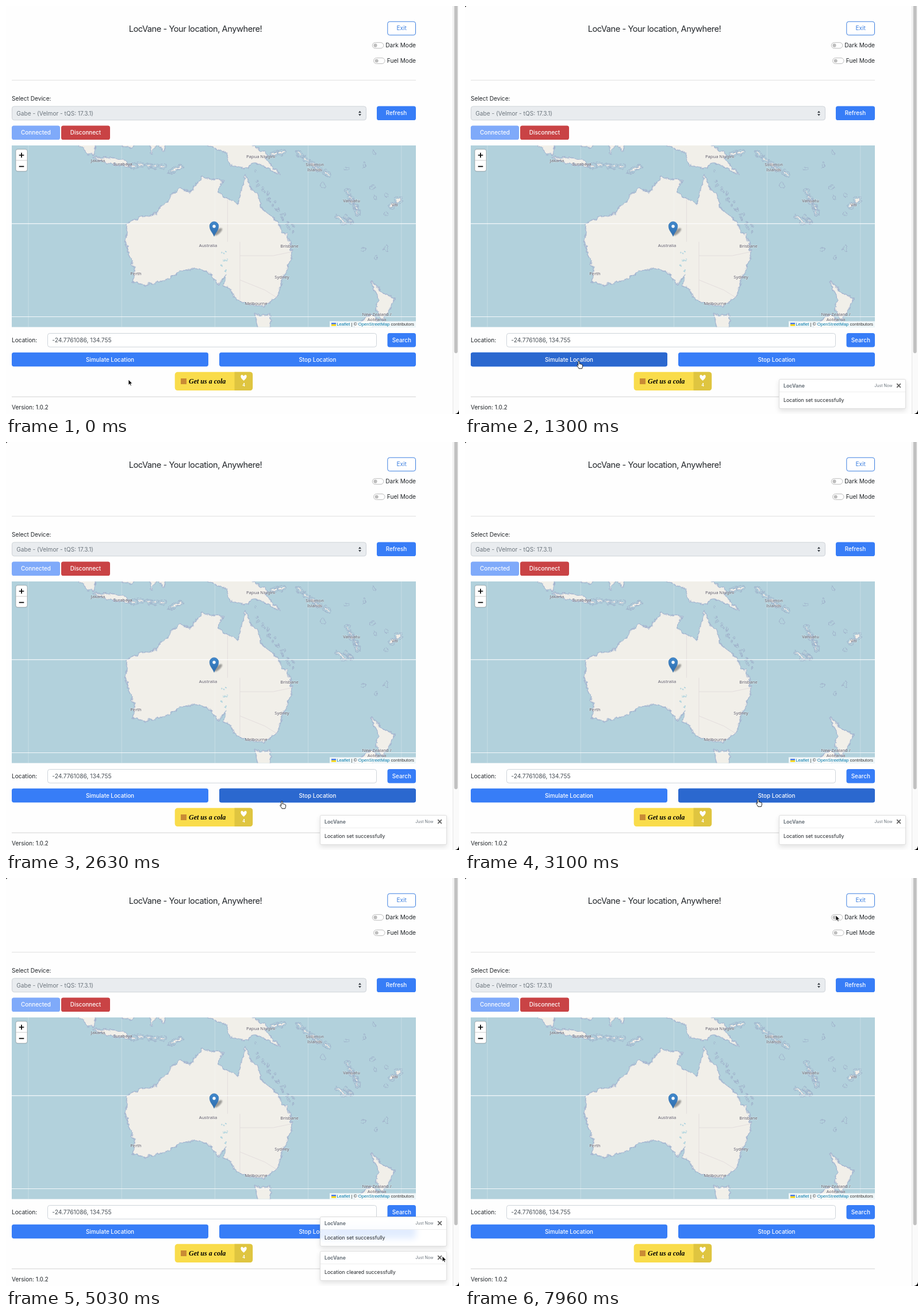
An HTML page that plays this animation: 788 by 711 pixels, repeating every 8000 ms.

```html
<!DOCTYPE html>
<html lang="en">
<head>
<meta charset="utf-8">
<title>Location simulator</title>
<style>
  html, body { margin: 0; width: 100%; height: 100%; overflow: hidden; background: #fefefe; }
  body { position: relative; font-family: Inter, sans-serif; }
  svg { position: absolute; left: 0; top: 0; }
  .label { font: 7.6px "Noto Sans", sans-serif; fill: #5c5864; text-anchor: middle;
    stroke: #fff; stroke-width: 1; stroke-opacity: .5; paint-order: stroke; }
  .toast { position: absolute; left: 545.5px; width: 219.5px; height: 50.5px; border: .6px solid #0002;
    border-radius: 3px; background: #ffffffd9; box-shadow: 0 4px 9px #0000001c;
    backdrop-filter: blur(6px); font-size: 8.8px; color: #212529; overflow: hidden; }
  .toast header { box-sizing: border-box; height: 22.5px; padding: 0 7.5px; display: flex; align-items: center;
    background: #ffffffd9; border-bottom: .6px solid #0001; color: #6c757d; }
  .toast b { flex: 1; }
  .toast small { font-size: 7px; margin-right: 6px; }
  .toast svg { position: static; }
  .toast p { margin: 0; padding: 0 7.5px; line-height: 28px; }
</style>
</head>
<body>
<svg id="page" width="788" height="711"></svg>
<div class="toast" id="setToast"></div>
<div class="toast" id="clearedToast"></div>
<svg width="788" height="711">
  <path id="arrow" d="M0 0V9.6L2.2 7.6 3.7 11 5.3 10.3 3.8 7H6.8Z" stroke="#fff" stroke-width=".8"/>
  <path id="hand" d="M-1.2 1.2a1.2 1.2 0 0 1 2.4 0V5c.6-.8 1.8-.5 2 .3 .7-.5 1.7-.2 1.8.6 .8-.4 1.6.1 1.6 1v2.5c0 1.6-1 2-1 3.4H0C-.5 11-2.4 9.2-3.2 7.8c-.5-1 .8-1.8 1.5-.9l.5.6z"
    fill="#fff" stroke="#000" stroke-width=".9"/>
  <path d="M788 704V711H781Q787 710 788 704Z"/>
  <path id="corner" d="M0 0H2.5Q.5 .5 0 2.5Z"/>
</svg>
<script>
const $ = id => document.getElementById(id);
const APP = 'LocVane', BLUE = '#377df7', HOVER = '#2b68cf';

// Page pieces
const box = (x, y, w, h, fill, more = '') =>
  `<rect x="${x}" y="${y}" width="${w}" height="${h}" rx="3.7" fill="${fill}" ${more}/>`;
const text = (x, y, str, more = '', size = 10.15, fill = '#212529') =>
  `<text x="${x}" y="${y}" dy=".36em" font-size="${size}" fill="${fill}" ${more}>${str}</text>`;
const centered = 'text-anchor="middle"';
const button = (x, y, w, label, fill = BLUE, hoverId = '') =>
  box(x, y, w, 24.5, fill) +
  (hoverId && box(x, y, w, 24.5, HOVER, `id="${hoverId}" opacity="0"`)) +
  text(x + w / 2, y + 12.2, label, centered + ' font-weight="500"', 9.9, '#fff');
const toggle = (x, y, label) =>
  `<rect x="${x}" y="${y - 5}" width="19.5" height="10" rx="5" fill="#fff" stroke="#bcbcbc"/>
   <circle cx="${x + 5.2}" cy="${y}" r="3.1" fill="#bdbdbd"/>` + text(713, y - .5, label, 'text-anchor="end"');
const rule = (y, color) => `<path d="M10 ${y}H713" stroke="${color}"/>`;

// Web Mercator map; latitudes are positive southwards
const project = (lon, lat) => [
  362 + (lon - 134.755) * 7.2,
  401 + 412.5 * (Math.asinh(Math.tan(lat * Math.PI / 180)) - .4465)
];
const line = pairs => 'M' + pairs.trim().split(/\s+/).map(p => project(...p.split(',').map(Number))).join('L');
const land = pairs => line(pairs) + 'Z';
const label = (x, y, str) => `<text class="label" x="${x}" y="${y}" dy=".36em">${str}</text>`;

let seed = 7;
const random = () => (seed = seed * 16807 % 2147483647) / 2147483647;
const times = (n, make) => Array.from({ length: n }, (_, i) => make(i)).join('');
const ellipse = (x, y, rx, ry, angle, more = '') =>
  `<ellipse rx="${rx}" ry="${ry}" transform="translate(${x} ${y}) rotate(${angle})" ${more}/>`;
const dot = (x, y, size) => ellipse(x, y, size * (.5 + random()), size * (.7 + random()), -20);

// Islands spread along a line, each inside its sea boundary
function chain(from, to, count, width) {
  const [x0, y0] = project(...from), [x1, y1] = project(...to);
  const dx = (x1 - x0) / count, dy = (y1 - y0) / count;
  const half = Math.hypot(dx, dy) * .38, angle = Math.atan2(dy, dx) * 180 / Math.PI;
  return times(count, i => {
    const x = x0 + dx * (i + .5) + (random() - .5) * 4, y = y0 + dy * (i + .5) + (random() - .5) * 4;
    return ellipse(x, y, half + 2.5, width + 3, angle) + ellipse(x, y, half, width, angle, 'fill="#f1efe9"');
  });
}

const coast =
  land(`115.1,34.3 115.7,32 113.4,26.2 113.8,22 116.7,20.7 120.9,19.7 122.2,17.8 123.5,17.2 124.4,15.6
    126.5,13.9 129,15 130.8,12.3 132,11.4 136.8,12.1 135.5,14.9 137.7,16.2 140.5,17.6 141.5,14.5
    142.3,10.7 143.6,14.2 145.2,15 146.2,18.6 149.2,20.8 150.8,23 153.1,26 153.5,29 151.3,33.8
    149.9,37.4 146.4,39 143.5,38.8 140.2,37.8 138.3,35.4 137.2,35.2 137.7,32.8 135.6,34.8 134,32.8
    131.2,31.5 126.5,32.2 123.5,33.9 118,35`) +
  land('132.8,3 134.5,4 138,5.5 138.6,8.2 142.8,9.2 144,7.7 146.2,8.3 150.6,10.6 147,6.8 147.6,5.9 144.5,3.9 142,3') +
  land('102,3 106,3 105.8,5.8 104.4,5.7') + land('105.4,6.6 108.5,6.6 112.7,6.9 114.5,8.6 109,7.8') +
  land('110,3 116.5,3 114.6,4.1') + land('119.4,3 119.6,5.5 121,3 122.5,5 123,3') +
  land('144.7,40.7 148.3,40.9 148,44 145.5,44') +
  land('172.7,34.4 175.6,36.7 178.4,37.7 177,39.7 175.4,41.6 173.8,39.4 174.8,38') +
  land('172.7,40.6 174.3,41.7 172,44 167,44');
const borders = line('138,16.4 138,26') + line('141,26 141,38') + line('141,29 149,29 153.4,28.2') +
  line('141,34 147,36 150,37.5');
const islands =
  chain([114.6, 8.4], [123, 8.6], 5, 1.8) + chain([123.5, 10.2], [127.2, 8.4], 1, 2.2) +
  chain([148.2, 6.1], [152.3, 4.8], 2, 2.5) + chain([154.4, 5.4], [162.5, 10.8], 5, 1.6) +
  chain([166.6, 14.2], [169.8, 20], 5, 1.4) + chain([163.8, 20], [167.2, 22.4], 1, 2) +
  chain([166.2, 20.3], [168.3, 21.8], 3, 1) + chain([177, 18.3], [180, 16.4], 2, 2.8);
const reef = times(24, i => {
  const k = i / 23;
  return dot(426 + 72 * k + random() * 10, 288 + 98 * k ** .8 + random() * 10, 1.8);
});
const atolls = times(12, () => dot(520 + random() * 160, 250 + random() * 200, 2.8));
const lakes = times(14, () => dot(374 + random() * 9, 426 + random() * 38, 1.3));
const tiles = times(5, i => `M${39 + 162.2 * i} 243V560`);

const map = `
  <defs>
    <clipPath id="mapClip"><rect x="10" y="243" width="703" height="316.5"/></clipPath>
    <filter id="rough" filterUnits="userSpaceOnUse" x="0" y="230" width="730" height="345" color-interpolation-filters="sRGB">
      <feTurbulence type="fractalNoise" baseFrequency=".13" numOctaves="3" seed="4"/>
      <feDisplacementMap in="SourceGraphic" scale="8" xChannelSelector="R" yChannelSelector="G"/>
    </filter>
    <filter id="soft"><feGaussianBlur stdDeviation="1.3"/></filter>
    <linearGradient id="pin" x2="0" y2="1"><stop stop-color="#4189cd"/><stop offset="1" stop-color="#2d6cad"/></linearGradient>
  </defs>
  <g clip-path="url(#mapClip)">
    <rect x="10" y="243" width="703" height="317" fill="#b2d1dc"/>
    <g filter="url(#rough)" stroke-linejoin="round">
      <path d="${coast}" fill="none" stroke="#a3b3cf" stroke-width="3.2"/>
      <path d="${coast}" fill="#f1efe9" stroke="#c3cfdb" stroke-width=".8"/>
      <g fill="none" stroke="#9dadc8" stroke-width=".9">${islands}${reef}${atolls}</g>
      <g fill="#b2d5df">${lakes}</g>
    </g>
    <path d="${borders}" fill="none" stroke="#e0d9da" stroke-width=".8"/>
    <path d="${tiles}" stroke="#fff" stroke-opacity=".28"/>
    <path d="M10 379.3H713M10 541.5H713" stroke="#fff" stroke-width="1.2" stroke-opacity=".85"/>
    ${label(160, 269, 'Jakarta')}${label(203, 275, 'Surabaya')}${label(443, 262, 'Papua Niugini')}
    ${label(537, 276, 'Solomon')}${label(537, 285, 'Islands')}${label(601, 339, 'Vanuatu')}
    ${label(676, 346, 'Viti')}${label(351.5, 417, 'Australia')}${label(493, 418, 'Brisbane')}
    ${label(480, 472, 'Sydney')}${label(435, 518, 'Melbourne')}${label(226, 466, 'Perth')}
    ${label(645, 537.5, 'New Zealand /')}${label(645, 546.5, 'Aotearoa')}
    ${ellipse(369, 393.5, 9, 3.6, -42, 'opacity=".35" filter="url(#soft)"')}
    <g transform="translate(362 401.3)">
      <path d="M0 0C-2-6-7.8-10-7.8-17.8a7.8 7.8 0 0 1 15.6 0C7.8-10 2-6 0 0Z" fill="url(#pin)" stroke="#2e6ca8" stroke-width=".6"/>
      <circle cy="-17.3" r="2.7" fill="#fff"/>
    </g>
    ${box(17, 249.7, 20, 38.3, '#fff', 'stroke="#0003" stroke-width="1.3"')}
    <path d="M17 269H37" stroke="#ccc"/>
    <path d="M22.7 260H31.3M27 255.7V264.3M22.7 279.6H31.3" stroke="#000" stroke-width="1.7"/>
    <rect x="563" y="549.3" width="150" height="11" fill="#ffffffcc"/>
    <path d="M566 552H574V554.8H566Z" fill="#4c7be1"/><path d="M566 554.8H574V557.6H566Z" fill="#ffd500"/>
    <text x="710" y="557.4" text-anchor="end" font-family="Liberation Sans, sans-serif" font-size="7.75" fill="#333"
      ><tspan fill="#0078a8">Leaflet</tspan> | © <tspan fill="#0078a8">OpenStreetMap</tspan> contributors</text>
  </g>`;

const tip = `
  <rect x="293.7" y="637.8" width="135.4" height="32.3" rx="5" fill="#f9dc4b"/>
  <path d="M397.5 637.8H424.1Q429.1 637.8 429.1 642.8V665.1Q429.1 670.1 424.1 670.1H397.5Z" fill="#dfc540"/>
  <rect x="304" y="649" width="10" height="10" fill="#c98b35"/>
  ${text(318, 653.5, 'Get us a cola', 'font-family="Liberation Serif, serif" font-weight="700" font-style="italic"', 12, '#000')}
  <path d="M0 5C-8-1-5-6-2.4-5-1-4.6 0-3 0-3s1-1.6 2.4-2C5-6 8-1 0 5z" transform="translate(413.5 648)" fill="#fff"/>
  ${text(413.5, 660.5, '4', centered + ' font-weight="700"', 7, '#fff')}`;

$('page').innerHTML =
  text(329.5, 39.5, APP + ' - Your location, Anywhere!', centered + ' letter-spacing="-.03em"', 14.6) +
  box(663.8, 27.2, 48.7, 23.5, '#fff', 'stroke="#3c7fe0"') + text(688.2, 38.8, 'Exit', centered, 10.15, '#3c7fe0') +
  toggle(637.3, 68.7, 'Dark Mode') + toggle(639.5, 95.5, 'Fuel Mode') + rule(129.3, '#dfdfdf') +
  text(10, 161.5, 'Select Device:') +
  box(10.5, 174.9, 616, 23.9, '#e9ecef', 'stroke="#ced3d8"') +
  text(18.3, 187, 'Gabe - (Velmor - tQS: 17.3.1)', '', 10.15, '#6c757d') +
  '<path d="M613 186l2.5-3.2 2.5 3.2zM613 188.2h5l-2.5 3.2z" fill="#343a40"/>' +
  button(645, 174.6, 68, 'Refresh') +
  button(10, 208.6, 84, 'Connected', '#7faafa') + button(96, 208.6, 85, 'Disconnect', '#c94345') +
  map +
  text(10, 582, 'Location:') + box(72.5, 570.5, 572, 23.7, '#fff', 'stroke="#ced4da"') +
  text(80.3, 582, '-24.7761086, 134.755', '', 10.2, '#495057') +
  button(663.5, 570, 49.5, 'Search') +
  button(10, 603.8, 342, 'Simulate Location', BLUE, 'simulate') +
  button(371, 603.8, 342, 'Stop Location', BLUE, 'stop') +
  tip + rule(681, '#d2d2d2') + text(10, 699, 'Version: 1.0.2') +
  `<path d="M777 0H788V711H777Z" fill="#fafafa"/><path d="M777.5 0V711" stroke="#e6e6e6"/>
   <rect x="779.7" y="-10" width="6" height="615" rx="3" fill="#c1c1c1"/>`;

const fillToast = (id, message) => $(id).innerHTML =
  `<header><b>${APP}</b><small>Just Now</small><svg width="9" height="9" viewBox="0 0 9 9">
   <path d="M1.2 1.2L7.8 7.8M7.8 1.2L1.2 7.8" stroke="#666" stroke-width="1.9"/></svg></header><p>${message}</p>`;
fillToast('setToast', 'Location set successfully');
fillToast('clearedToast', 'Location cleared successfully');

// Cursor moves: start ms, end ms, destination
const moves = [
  [0, 560, 198, 619], [1300, 1700, 207, 619], [1930, 2630, 480, 626], [2630, 4030, 593, 613],
  [4530, 5030, 759, 659], [5200, 5500, 753, 661], [6430, 6630, 752, 641], [6700, 6960, 753, 651],
  [7440, 7960, 645, 65]
];
const ramp = (t, from, to) => Math.min(1, Math.max(0, (t - from) / (to - from)));
const ease = p => p * p * (3 - 2 * p);
const cursorAt = t => moves.reduce(([x, y], [from, to, toX, toY]) => {
  const k = ease(ramp(t, from, to));
  return [x + (toX - x) * k, y + (toY - y) * k];
}, [213, 651]);
const over = (t, left) => {
  const [x, y] = cursorAt(t);
  return x > left && x < left + 342 && y > 603.8 && y < 628.3;
};
// Average over the last 150 ms gives the hover transition
const hover = (t, left) => [0, 30, 60, 90, 120].reduce((sum, d) => sum + over(t - d, left), 0) / 5;

function showToast(id, top, opacity) {
  const style = $(id).style;
  style.top = top + 'px';
  style.opacity = opacity;
  style.visibility = opacity ? 'visible' : 'hidden';
}
function draw(now) {
  const t = now % 8000, [x, y] = cursorAt(t);
  const pointing = over(t, 10) || over(t, 371);
  for (const [id, shown] of [['arrow', !pointing], ['hand', pointing]]) {
    $(id).setAttribute('transform', `translate(${x} ${y})`);
    $(id).setAttribute('visibility', shown ? 'visible' : 'hidden');
  }
  $('corner').setAttribute('visibility', t < 30 ? 'hidden' : 'visible');
  $('simulate').setAttribute('opacity', hover(t, 10));
  $('stop').setAttribute('opacity', hover(t, 371));
  showToast('setToast', t < 4600 ? 649.5 : t < 6420 ? 589.5 : 642, ramp(t, 900, 1050) - ramp(t, 7240, 7360));
  showToast('clearedToast', 649.5, ramp(t, 4600, 4750) - ramp(t, 6270, 6420));
  requestAnimationFrame(draw);
}
requestAnimationFrame(draw);
</script>
</body>
</html>
```
